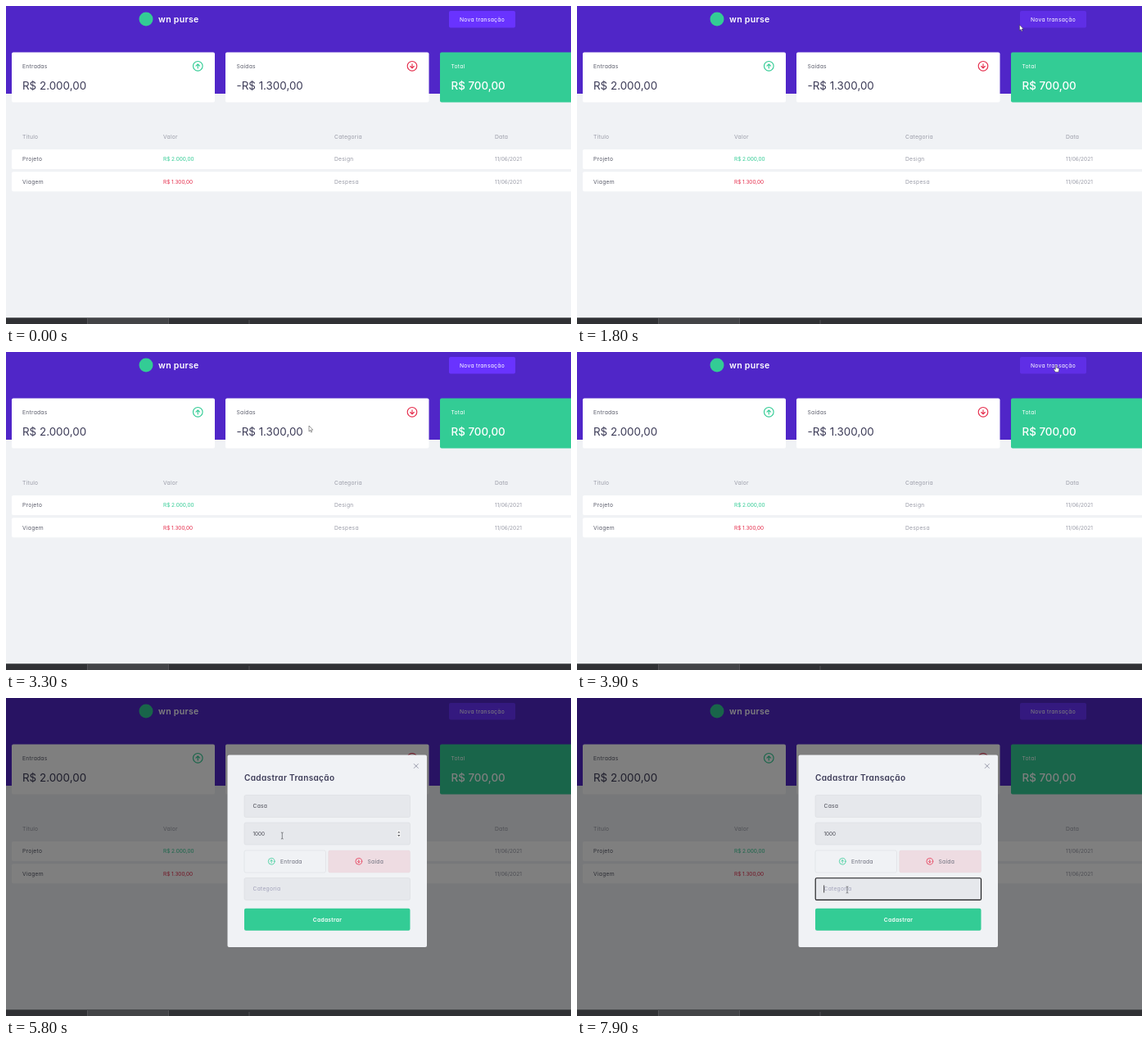
Animation, 690 px wide and 388 px high, one loop 8 s. Source, as an HTML page:

```html
<!DOCTYPE html>
<html lang="pt-BR">
<head>
<meta charset="utf-8">
<title>Transações</title>
<style>
  html, body { margin: 0; width: 100%; height: 100%; overflow: hidden; background: #f0f2f5; }
  svg { display: block; width: 690px; height: 388px; }
  text { font-family: Inter, Roboto, sans-serif; font-feature-settings: "cv11"; white-space: pre; }
</style>
</head>
<body>
<svg id="stage" viewBox="0 0 690 388" xmlns="http://www.w3.org/2000/svg"></svg>
<script>
const LOOP = 8000, STEP = 100;
const GREEN = '#33cc95', RED = '#e52e4d', MUTED = '#9a9ca8', BODY = '#5c5e6c', TITLE = '#3d3c58';
const OPEN = 4200, FOCUS = 6800;

// y is the middle of the capital letters
const text = (x, y, s, { size = 6.75, fill = BODY, weight = 400, gap = .035, id = '' } = {}) =>
  `<text ${id && `id="${id}"`} x="${x}" y="${y + size * .36}" font-size="${size}" fill="${fill}" font-weight="${weight}" letter-spacing="${gap * size}">${s}</text>`;

const box = (x, y, w, h, fill, extra = '') =>
  `<rect x="${x}" y="${y}" width="${w}" height="${h}" rx="2" fill="${fill}" ${extra}/>`;

const money = (x, y, s, fill = TITLE, weight = 400) =>
  text(x, y, s, { size: 13.4, fill, weight, gap: 0 });

function arrowIcon(x, y, r, color, down) {
  const k = r / 6;
  return `<g transform="translate(${x} ${y}) scale(${k} ${down ? -k : k})" fill="none" stroke="${color}"
    stroke-width="1.15" stroke-linecap="round" stroke-linejoin="round">
    <circle r="5.8"/><path d="M0 2.6V-2.4M-2.3 -.2L0 -2.5L2.3 -.2"/></g>`;
}

function row(y, name, value, color, kind) {
  return box(7, y - 12, 700, 24, '#fff') +
    text(20, y, name) +
    text(192, y, value, { size: 6.45, fill: color, gap: 0 }) +
    text(401, y, kind, { fill: MUTED }) +
    text(597, y, '11/06/2021', { size: 6.5, fill: MUTED, gap: 0 });
}

const page = () => `
  <rect width="690" height="388" fill="#f0f2f5"/>
  <rect width="690" height="107" fill="#5026c8"/>
  <circle cx="171" cy="16" r="8.5" fill="${GREEN}"/>
  ${text(186, 16, 'wn purse', { size: 10.6, fill: '#fff', weight: 600, gap: .025 })}
  <rect id="newBtn" x="541" y="6" width="81" height="20.5" rx="2"/>
  ${text(554, 16.2, 'Nova transação', { fill: '#fff', gap: .04 })}
  ${box(7, 56.5, 248, 61, '#fff')}
  ${text(20, 73.5, 'Entradas')}${money(20, 97, 'R$ 2.000,00')}
  ${arrowIcon(234.3, 73.3, 6, GREEN)}
  ${box(268, 56.5, 248.5, 61, '#fff')}
  ${text(281.5, 73.5, 'Saídas')}${money(281.5, 97, '-R$ 1.300,00')}
  ${arrowIcon(496, 73.3, 6, RED, true)}
  ${box(530, 56.5, 248, 61, GREEN)}
  ${text(543.5, 73.5, 'Total', { fill: '#fff' })}${money(543.5, 97, 'R$ 700,00', '#fff', 500)}
  ${[[20, 'Título'], [192, 'Valor'], [401, 'Categoria'], [597, 'Data']]
    .map(([x, s]) => text(x, 159.5, s, { fill: MUTED })).join('')}
  ${row(187, 'Projeto', 'R$ 2.000,00', GREEN, 'Design')}
  ${row(214.3, 'Viagem', 'R$ 1.300,00', RED, 'Despesa')}`;

const edge = 'stroke="#d6d8dd" stroke-width=".5"';
const field = (y, s, opt) => box(291, y, 202.5, 27, '#e6e8ec', edge) + text(301.5, y + 13.5, s, opt);

const modal = () => `<g id="modal">
  <rect width="690" height="381" fill="#000" opacity=".5"/>
  ${box(270.5, 69.5, 243.5, 234.5, '#f0f2f5')}
  <path d="M498.3 80.5l5 5m0 -5l-5 5" stroke="#85879a" stroke-width=".8" stroke-linecap="round"/>
  ${text(291, 97.5, 'Cadastrar Transação', { size: 10.1, fill: TITLE, weight: 600, gap: .03 })}
  ${field(118.5, 'Casa', { fill: '#4c4d57' })}
  ${field(152, '1000', { size: 6.3, fill: '#4c4d57', gap: 0 })}
  <g id="spin"><rect x="477.5" y="161.5" width="4.5" height="8.5" fill="#f3f3f4"/>
    <path d="M478.3 164.6l1.5 -1.9l1.5 1.9zM478.3 167l1.5 1.9l1.5 -1.9z" fill="#505055"/></g>
  ${box(291, 186, 99.5, 27, '#f0f2f5', edge)}
  ${arrowIcon(324.2, 199.3, 4, GREEN)}${text(335, 199.3, 'Entrada', { fill: '#6c6e7c' })}
  ${box(393.7, 186, 99.8, 27, '#eedce2', 'stroke="#e2d3d9" stroke-width=".4"')}
  ${arrowIcon(430.8, 199.3, 4, RED, true)}${text(441.5, 199.3, 'Saída', { fill: '#6c6e7c' })}
  ${field(219.5, 'Categoria', { fill: '#a3a3bb' })}
  <rect id="ring" x="291.2" y="219.8" width="202.3" height="26.6" rx="1.5" fill="none" stroke="#17171a" stroke-width="1.1"/>
  <rect id="caret" x="301.3" y="228.5" width=".8" height="9" fill="#222"/>
  ${box(291, 256.8, 202.5, 27, GREEN)}
  ${text(374.8, 270.2, 'Cadastrar', { fill: '#fff', weight: 600 })}
</g>`;

const taskbar = `
  <rect y="380.3" width="690" height="7.7" fill="#303134"/>
  <rect x="99.5" y="381" width="99" height="7" fill="#434447"/>
  <path d="M99.5 381v7M198.5 381v7M297 383v5" stroke="#606165" stroke-width=".7"/>`;

const pointers = `<g id="pointer">
  <path id="arrow" d="M0 0V6.9L1.5 5.5L2.6 8L3.7 7.5L2.6 5.1H4.8Z" fill="#fff" stroke="#222" stroke-width=".45"/>
  <path id="hand" d="M-.7 .7Q0 -.4 .7 .7V3.2L3.2 3.9Q4 4.2 3.8 5.2L3.1 8.4H-.8L-2.8 5.4Q-2.8 4.2 -1.6 4.8L-.7 5.6Z" fill="#fff" stroke="#222" stroke-width=".45"/>
  <path id="beam" d="M-1.4 -4Q0 -4 0 -3.2Q0 -4 1.4 -4M0 -3.2V3.2M-1.4 4Q0 4 0 3.2Q0 4 1.4 4" fill="none" stroke="#55565c" stroke-width=".7"/>
</g>`;

const stage = document.getElementById('stage');
stage.innerHTML = page() + modal() + taskbar + pointers;
const $ = id => document.getElementById(id);
const show = (id, on) => $(id).setAttribute('visibility', on ? 'inherit' : 'hidden');

// time, x, y of the pointer
const path = [
  [1600, 608, 48], [1700, 592, 20], [1900, 480, 32], [2100, 350, 48], [2400, 233, 30.5],
  [2600, 233, 30.5], [2800, 202, 120], [3000, 245, 205], [3200, 335, 140], [3300, 370, 90],
  [3500, 445, 58], [3700, 545, 24], [3900, 585, 16], [4200, 585, 16],
  [4500, 470, 70], [4900, 347.5, 131], [5400, 347.5, 131], [5800, 337.3, 168],
  [6300, 337.3, 168], [6600, 330, 234], [8000, 330, 234]
];

function slope(i, k) {
  const a = path[i - 1], p = path[i], b = path[i + 1];
  if (!a || !b || a[k] === p[k] || b[k] === p[k]) return 0;
  return (b[k] - a[k]) / (b[0] - a[0]);
}

function pointerAt(t) {
  const i = Math.max(0, path.findIndex(p => p[0] > t) - 1);
  const a = path[i], b = path[i + 1], d = b[0] - a[0], u = (t - a[0]) / d;
  return [1, 2].map(k =>
    a[k] * (1 + 2 * u) * (1 - u) ** 2 + b[k] * u * u * (3 - 2 * u) +
    d * u * (1 - u) * (slope(i, k) * (1 - u) - slope(i + 1, k) * u));
}

const ramp = (t, from) => Math.min(1, Math.max(0, (t - from) / 200));
const inside = (x, y, l, t, r, b) => x >= l && x <= r && y >= t && y <= b;

function draw(time) {
  const t = Math.floor(time / STEP) * STEP;
  const open = t >= OPEN;
  const hover = ramp(t, 1600) - ramp(t, 1800) + ramp(t, 3600) - ramp(t, OPEN);
  const mix = [105, 51, 255].map(c => Math.round(c * (1 - .1 * hover)));
  $('newBtn').setAttribute('fill', `rgb(${mix})`);
  show('modal', open);

  const seen = t >= path[0][0];
  show('pointer', seen);
  let overAmount = false;
  if (seen) {
    const [x, y] = pointerAt(t);
    const inField = top => open && inside(x, y, 291, top, 494, top + 27);
    overAmount = inField(152);
    const beam = overAmount || inField(118.5) || inField(219.5);
    const hand = !open && inside(x, y, 541, 6, 622, 27);
    $('pointer').setAttribute('transform', `translate(${x.toFixed(2)} ${y.toFixed(2)})`);
    show('beam', beam);
    show('hand', hand);
    show('arrow', !beam && !hand);
  }
  // nested parts follow their group's visibility
  if (!seen) ['beam', 'hand', 'arrow'].forEach(id => show(id, false));
  show('spin', overAmount);
  show('ring', t >= FOCUS);
  show('caret', t >= FOCUS && (t < 7300 || t >= 7900));
}

const start = performance.now();
function tick() {
  draw((performance.now() - start) % LOOP);
  requestAnimationFrame(tick);
}
tick();
</script>
</body>
</html>
```
